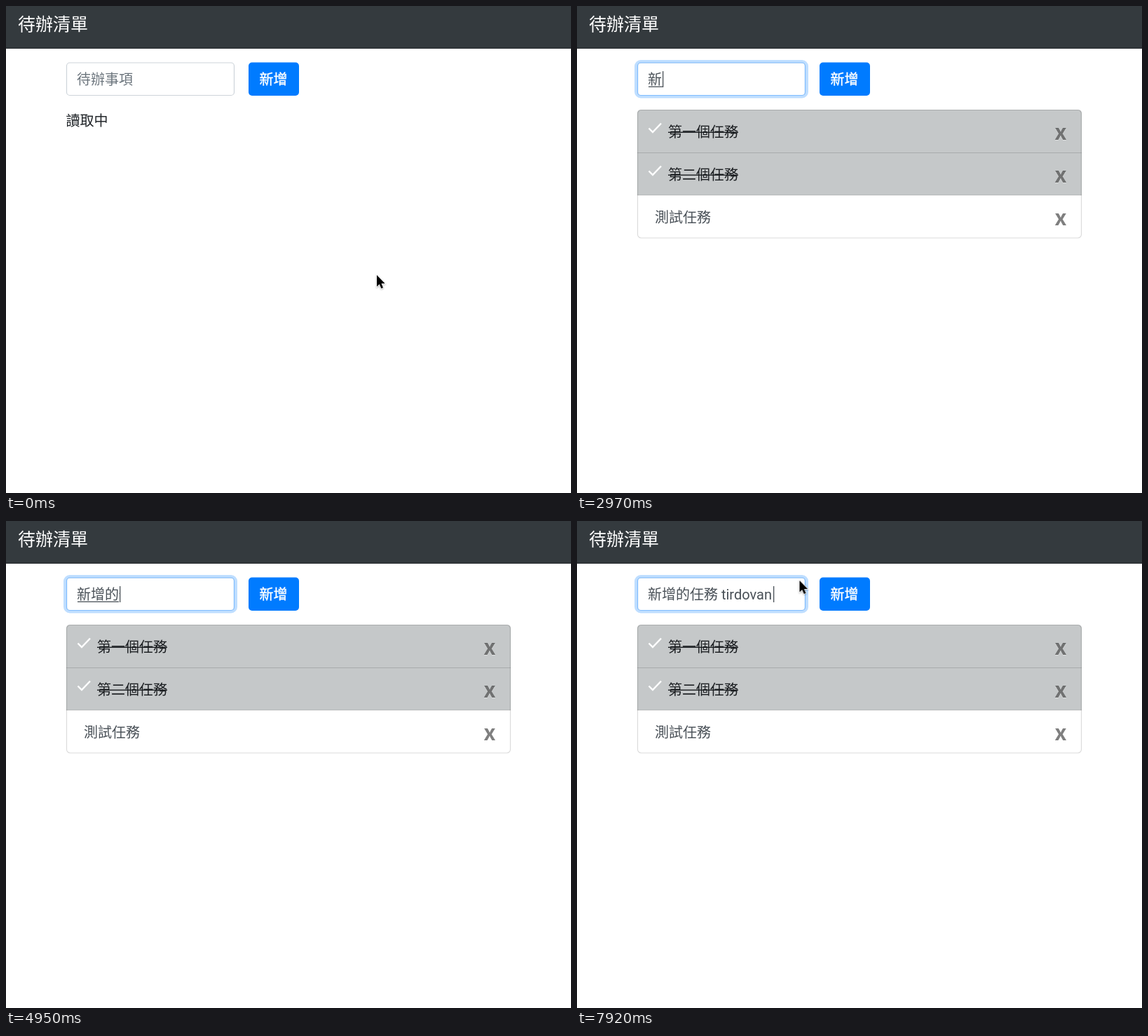
Recreate the animation shown at these times as an HTML page. Size 806 by 695 pixels, loop 8 s.

```html
<!DOCTYPE html>
<html lang="zh-Hant">
<head>
<meta charset="utf-8">
<title>待辦清單</title>
<style>
  html, body { margin: 0; width: 100%; height: 100%; overflow: hidden; background: #fff; }
  svg { display: block; width: 100%; height: 100%; }
  text { font: 20px Roboto, "Noto Sans CJK TC", "Noto Sans CJK", sans-serif; white-space: pre; }
  .title { font-size: 25px; fill: #fff; }
  .add { fill: #fff; stroke: #fff; stroke-width: .4px; font-weight: 500; }
  .hint { fill: #6c757d; }
  .entry { fill: #495057; }
  .task { fill: #1b1e21; }
  .close { font: 700 30px Inter, "Liberation Sans", sans-serif; text-anchor: middle; }
  .option { font-size: 16.5px; fill: #000; }
  .menu { filter: drop-shadow(0 1px 2px rgba(0, 0, 0, .4)); }
  .arrow { filter: drop-shadow(0 1px 1px rgba(0, 0, 0, .3)); }

  .loading, .list, .hover, .done, .focus, .hint, .menu, .typed, .compose, .arrow, .caret {
    animation: 8s step-end infinite;
  }
  .loading { animation-name: loading; }
  .list { animation-name: loaded; }
  .hover { animation-name: hover; }
  .done, .focus { animation-name: focused; }
  .hint { animation-name: hint; }
  .menu { animation-name: menu; }
  .typed { animation-name: typed; }
  .compose { animation-name: compose; }
  .caret { animation-name: type; }
  .arrow { animation-name: point; }

  @keyframes loading { 0% { visibility: visible } 12.375%, 100% { visibility: hidden } }
  @keyframes loaded { 0% { visibility: hidden } 12.375%, 100% { visibility: visible } }
  @keyframes hover { 0%, 24.75%, 100% { visibility: hidden } 12.375% { visibility: visible } }
  @keyframes focused { 0% { visibility: hidden } 24.75%, 100% { visibility: visible } }
  @keyframes hint { 0% { visibility: visible } 37.125%, 100% { visibility: hidden } }
  @keyframes menu { 0%, 37.125%, 100% { visibility: hidden } 24.75% { visibility: visible } }
  @keyframes typed { 0% { visibility: hidden } 37.125%, 100% { visibility: visible } }
  @keyframes compose { 0%, 74.25%, 100% { visibility: hidden } 37.125% { visibility: visible } }
  @keyframes type {
    0% { transform: translate(122px, 0) }
    49.5% { transform: translate(142px, 0) }
    61.875% { transform: translate(162px, 0) }
    74.25% { transform: translate(202px, 0) }
    86.625%, 100% { transform: translate(280px, 0) }
  }
  @keyframes point {
    0% { transform: translate(529px, 384px); visibility: visible }
    12.375% { transform: translate(224px, 222px); visibility: visible }
    24.75% { transform: translate(253px, 107px); visibility: visible }
    37.125% { transform: translate(253px, 107px); visibility: hidden }
    99%, 100% { transform: translate(317.5px, 85px); visibility: visible }
  }
</style>
</head>
<body>
<svg viewBox="0 0 806 695" preserveAspectRatio="none">
  <defs>
    <clipPath id="field"><rect x="88" y="83" width="236" height="43"/></clipPath>
    <clipPath id="card"><rect x="86" y="148" width="634" height="183.5" rx="5"/></clipPath>
    <path id="tick" d="M102.5 174.5L108 180L120 167.5" fill="none" stroke="#fff" stroke-width="2.4"/>
    <g id="close">
      <text class="close" x="690" y="192" fill="#fff" fill-opacity=".5">x</text>
      <text class="close" x="690" y="191" fill-opacity=".5">x</text>
    </g>
  </defs>

  <rect width="806" height="60.5" fill="#343a3e"/>
  <rect y="59.5" width="806" height="1.3" fill="#24292c"/>
  <text class="title" x="17" y="35.3">待辦清單</text>

  <text class="loading" x="85.5" y="170.6" fill="#212529">讀取中</text>

  <g class="list">
    <g clip-path="url(#card)">
      <rect x="86" y="148" width="634" height="122" fill="#c5c8c9"/>
      <rect class="hover" x="86" y="209" width="634" height="62" fill="#b9bbbf"/>
      <path d="M86 209.5H720M86 270H720" stroke="#000" stroke-opacity=".14" stroke-width="1.2"/>
    </g>
    <rect x="86.5" y="148.5" width="633" height="182.5" rx="5" fill="none" stroke="#000" stroke-opacity=".14" stroke-width="1.2"/>
    <use href="#tick"/>
    <use href="#tick" y="61"/>
    <text class="task" x="130" y="187">第一個任務</text>
    <text class="task" x="130" y="248">第二個任務</text>
    <text class="entry" x="111" y="309">測試任務</text>
    <rect x="130" y="179.6" width="100" height="1.4" fill="#1b1e21"/>
    <rect class="done" x="130" y="240.6" width="100" height="1.4" fill="#1b1e21"/>
    <use href="#close"/>
    <use href="#close" y="61"/>
    <use href="#close" y="122"/>
  </g>

  <rect x="86.5" y="81" width="239" height="46.5" rx="4.5" fill="#fff" stroke="#ced4da" stroke-width="1.2"/>
  <g class="focus" fill="none">
    <rect x="84" y="79" width="244" height="50.5" rx="7" stroke="#bfdeff" stroke-width="4"/>
    <rect x="86.5" y="81" width="239" height="46.5" rx="4.5" stroke="#80bdff" stroke-width="1.2"/>
  </g>
  <text class="hint" x="101" y="112.2">待辦事項</text>
  <g class="typed" clip-path="url(#field)">
    <text class="entry" x="101" y="112.2">新增的任務 tirdovan</text>
    <rect class="compose" x="102" y="114.6" width="59" height="1.3" fill="#495057"/>
    <g class="caret">
      <rect y="80" width="240" height="50" fill="#fff"/>
      <rect y="93" width="1.3" height="23" fill="#495057"/>
    </g>
  </g>

  <rect x="346" y="80.5" width="72" height="47.5" rx="5" fill="#007bff"/>
  <text class="add" x="361.5" y="112.2">新增</text>

  <g class="menu">
    <path d="M84.5 129.5H326V190a4 4 0 0 1-4 4H88.500a4 4 0 0 1-4-4Z" fill="#fff"/>
    <text class="option" x="99.500" y="167.500">qwef</text>
  </g>

  <path class="arrow" d="M0 0V16.500L3.700 13.100L6.300 19L9 17.900L6.500 12.100H11.600Z" stroke="#fff" stroke-width="1.500" paint-order="stroke"/>
</svg>
</body>
</html>
```
